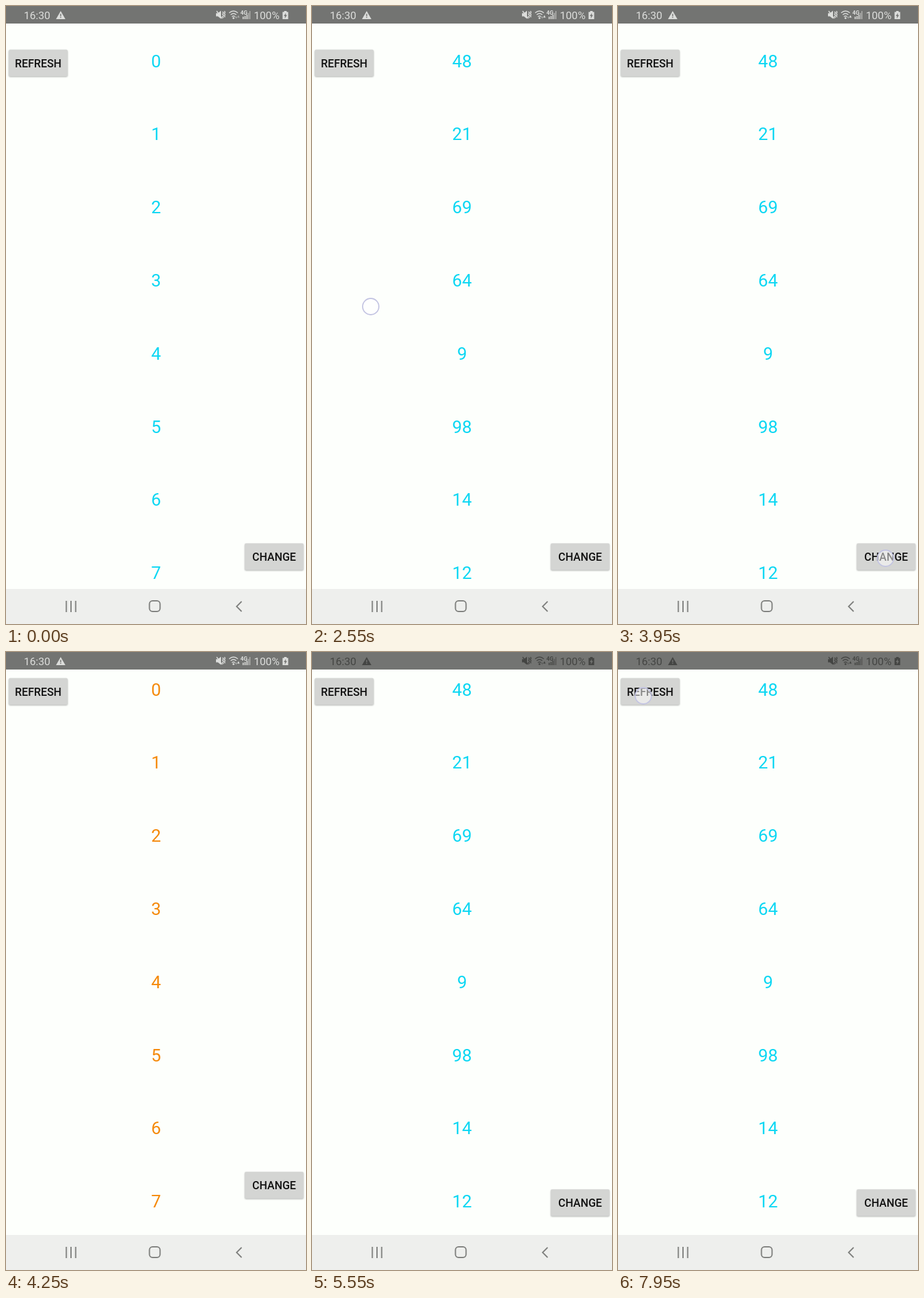
Write an HTML page that moves like this. It is 480x987 px and loops after 8000 ms.

```html
<!DOCTYPE html>
<html lang="en">
<head>
<meta charset="utf-8">
<title>Number list</title>
<style>
  html, body { margin: 0; width: 100%; height: 100%; overflow: hidden; background: #fdfffc; }
  svg { display: block; width: 100%; height: 100%; font-family: Roboto, sans-serif; }
  .num { font-size: 28px; text-anchor: middle; }
  .label { font-size: 17.5px; font-weight: 500; text-anchor: middle; fill: #111; }
  .face { fill: #d4d5d3; filter: drop-shadow(0 1px 1px rgba(0, 0, 0, .3)); }
  .line { fill: none; stroke: currentColor; }
  #status { color: #dcdddb; fill: currentColor; font-size: 17px; }
  #nav { fill: none; stroke: #7f807e; stroke-width: 2; }
  #cursor { fill: rgba(255, 255, 255, .5); stroke: #c3c4e2; stroke-width: 1.8; }
</style>
</head>
<body>
<svg viewBox="0 0 480 987">
  <rect width="480" height="987" fill="#fdfffc"/>
  <g id="cyan" fill="#0cd7f3"></g>
  <g id="orange" fill="#f58a0b"></g>
  <g id="change"></g>
  <rect width="480" height="28" fill="#737472"/>
  <g id="status">
    <text x="28.5" y="21">16:30</text>
    <text x="396.5" y="21">100%</text>
    <path d="M87.500 8L95 21H80Z"/>
    <path d="M87.500 12.500v4M87.500 17.500v1.500" stroke="#737472" stroke-width="1.600"/>
    <path d="M336 11.500h3l5 -4v13l-5 -4h-3z"/>
    <path class="line" stroke-width="1.500" d="M337 8l9 12M346.500 9l1.500 2l-1.500 2l1.500 2l-1.500 2l1.500 2M349.500 8l1 2l-1 2l1 2l-1 2l1 2"/>
    <g class="line" stroke-width="1.400">
      <path d="M357 11q7 -6 14 0M359.500 14q4.500 -4 9 0M361.500 17q2.500 -2 5 0"/>
    </g>
    <circle cx="364" cy="19.300" r="1.500"/>
    <path opacity=".5" d="M366.500 17h3.500l-1.700 3.500z"/>
    <path id="arrow" d="M370 18.500h3.800l-1.900 -4z"/>
    <text x="375" y="14" font-size="9" font-weight="700">4G</text>
    <path class="line" stroke-width="1.700" d="M379.500 21v-4M382.500 21v-5M385.500 21v-7"/>
    <path class="line" stroke-width="1.500" opacity=".6" d="M388 21v-10M390.300 21v-13"/>
    <path d="M445 8h4v1.500h2.500v11.500h-9v-11.500h2.500z"/>
    <path d="M448 11l-3.500 5h2l-.5 4l3.700 -5.500h-2.200z" fill="#737472"/>
  </g>
  <rect y="931" width="480" height="56" fill="#eeefed"/>
  <g id="nav">
    <path d="M96.500 950v18M104 950v18M111.500 950v18"/>
    <rect x="229.500" y="950" width="17" height="17" rx="5"/>
    <path d="M377 951l-8 8l8 8"/>
  </g>
  <circle id="cursor" r="13"/>
</svg>
<script>
const $ = id => document.getElementById(id);
const PITCH = 480 / 411 * 100;
const COUNTING = [0, 1, 2, 3, 4, 5, 6, 7, 8];
const SHUFFLES = [
  [85, 76, 6, 23, 46, 4, 79, 72, 31],
  [48, 21, 69, 64, 9, 98, 14, 12, 65]
];

// start, duration, button, touch x, touch y
const PRESSES = [
  [1000, 450, 'refresh', 41, 96], [1650, 450, 'refresh', 42, 95],
  [3950, 280, 'change', 428, 882], [4600, 550, 'change', 428, 854],
  [5950, 450, 'refresh', 42, 66], [6450, 450, 'refresh', 42, 65],
  [6950, 450, 'refresh', 40, 62], [7450, 450, 'refresh', 41, 66],
  [7950, 450, 'refresh', 40.5, 70]
];

const clamp = v => Math.max(0, Math.min(1, v));
const span = (t, from, to) => clamp((t - from) / (to - from));
const ease = p => (1 - Math.cos(Math.PI * p)) / 2;

const button = (x, y, width, label) => `
  <rect class="face" x="${x}" y="${y}" width="${width}" height="42.5" rx="2"/>
  <rect class="shade" x="${x}" y="${y}" width="${width}" height="42.5" rx="2" fill="#000"/>
  <text class="label" x="${x + width / 2}" y="${y + 28.2}">${label}</text>`;

function buildPanel(id) {
  const rows = COUNTING.map((n, i) =>
    `<text class="num" x="240" y="${97.6 + i * PITCH}">${n}</text>`).join('');
  $(id).innerHTML = `<g class="rows">${rows}</g>${button(4.5, 69.7, 94, 'REFRESH')}`;
}

buildPanel('cyan');
buildPanel('orange');
$('change').innerHTML = button(382, 858.2, 94, 'CHANGE');

const cyanRows = $('cyan').querySelector('.rows');
const cyanTexts = [...cyanRows.children];

function place(id, x, y, opacity) {
  $(id).setAttribute('transform', `translate(${x} ${y})`);
  $(id).setAttribute('opacity', opacity);
}

function shade(id, amount) {
  $(id).querySelector('.shade').setAttribute('opacity', amount * .13);
}

function touchAt(t) {
  for (const [start, length, , x, y] of PRESSES) {
    const age = t - start;
    if (age >= 0 && age < length * .6)
      return [x, y, 1 - span(age, length * .4, length * .6)];
  }
  if (t >= 2550 && t < 2850)
    return [94, 480 + 405 * ease(span(t, 2550, 2780)), 1 - span(t, 2750, 2850)];
  if (t >= 3050 && t < 3750)
    return [94 - 23 * span(t, 3050, 3650) ** 2.8, 484 - scrollAt(t), 1 - span(t, 3640, 3750)];
  return [0, 0, 0];
}

function scrollAt(t) {
  return 181 * Math.sin(Math.PI * span(t, 3050, 3650)) ** 2;
}

function render(t) {
  const numbers = t < 1200 ? COUNTING : SHUFFLES[t < 1850 ? 0 : 1];
  cyanTexts.forEach((el, i) => { el.textContent = numbers[i]; });
  cyanRows.setAttribute('transform', `translate(0 ${-scrollAt(t)})`);

  // Each switch brings one panel in from the left and sends the other right.
  const away = ease(span(t, 4000, 4250));
  const back = ease(span(t, 5150, 5550));
  const returning = t >= 5150;
  if (returning) {
    place('cyan', -240 * (1 - back), -28, back);
    place('orange', 240 * back, -28, 1 - back);
  } else {
    place('cyan', 240 * away, 0, 1 - away);
    place('orange', -240 * (1 - away), -28, away);
  }
  place('change', 0, t >= 4050 && !returning ? -28 : 0, 1);
  $('status').style.color = returning ? '#444543' : '#dcdddb';
  $('arrow').setAttribute('opacity', t < 2550 ? .5 : 1);

  const pressed = { refresh: 0, change: 0 };
  for (const [start, length, name] of PRESSES) {
    const amount = Math.min(clamp((t - start) / 150), clamp((start + length - t) / 130));
    pressed[name] = Math.max(pressed[name], amount);
  }
  shade('cyan', pressed.refresh);
  shade('orange', 0);
  shade('change', pressed.change);
  place('cursor', ...touchAt(t));
}

function tick() {
  render(performance.now() % 8000);
  requestAnimationFrame(tick);
}
tick();
</script>
</body>
</html>
```
